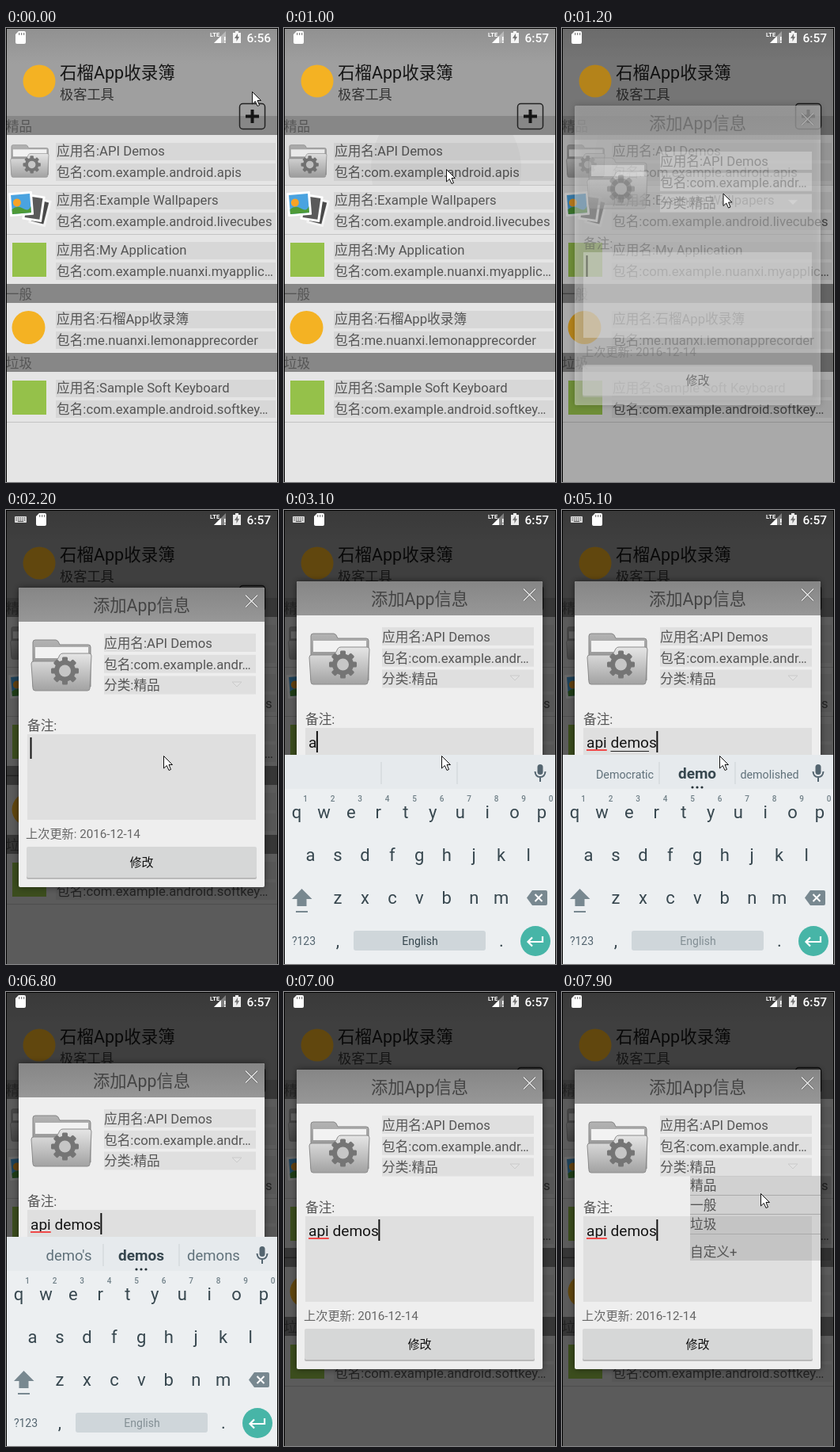
An HTML page with a canvas that plays this animation: 344x573 px, repeating every 8 s.

```html
<!DOCTYPE html>
<html lang="zh">
<head>
<meta charset="utf-8">
<title>App recorder demo</title>
<style>
  html, body { margin: 0; height: 100%; overflow: hidden; background: #000; }
  canvas { display: block; width: 344px; height: 573px; }
</style>
</head>
<body>
<canvas></canvas>
<script>
const W = 344, H = 573, LOOP = 8000, STEP = 100;
const canvas = document.querySelector('canvas');
const ctx = canvas.getContext('2d');
const ratio = window.devicePixelRatio || 1;
canvas.width = W * ratio;
canvas.height = H * ratio;

const FONT = 'Roboto, "Noto Sans CJK SC", "Noto Sans CJK", sans-serif';
const APP = '石榴App收录簿';
const INK = '#37474f';

// Timeline
const pointerPath = [
  [0, 311, 80], [100, 300, 110], [300, 240, 210], [500, 205, 178], [1100, 205, 178],
  [1500, 199, 300], [1600, 199, 300], [1800, 199, 313], [1900, 199, 310], [7100, 199, 310],
  [7200, 252, 250], [7500, 277, 222], [7700, 277, 222], [7900, 251, 254]
];
const typing = [
  [0, ''], [3100, 'a'], [3200, 'ap'], [3300, 'api'], [3800, 'api '], [4600, 'api d'],
  [4700, 'api de'], [4800, 'api dem'], [4900, 'api demo'], [5100, 'api demos']
];
const suggestions = [
  [0, []], [3200, ['as', 'a', 'at']], [3300, ['app', 'ap', 'apple']],
  [3400, ['apps', 'api', 'apiece']], [4000, []], [4700, ['do', 'd', 'did']],
  [4800, ['den', 'de', 'dear']], [4900, ['den', 'dem', 'demand']],
  [5000, ['Democratic', 'demo', 'demolished']], [5200, ["demo's", 'demos', 'demons']]
];
const caretOff = [[1700, 1900], [2800, 3100], [4200, 4600], [5700, 6200], [6600, 6800], [7300, 7800]];

const clamp = v => Math.max(0, Math.min(1, v));
const progress = (t, from, to) => clamp((t - from) / (to - from));
const easeOut = p => 1 - (1 - p) ** 2;
const within = (t, from, to) => t >= from && t < to;
const latest = (track, t) => track.filter(k => k[0] <= t).pop()[1];

function pointerAt(t) {
  const next = pointerPath.findIndex(k => k[0] > t);
  if (next < 0) return pointerPath[pointerPath.length - 1].slice(1);
  const a = pointerPath[next - 1], b = pointerPath[next];
  const p = progress(t, a[0], b[0]);
  return [a[1] + (b[1] - a[1]) * p, a[2] + (b[2] - a[2]) * p];
}

// Drawing helpers
function box(x, y, w, h, color, r = 0) {
  ctx.fillStyle = color;
  ctx.beginPath();
  ctx.roundRect(x, y, w, h, r);
  ctx.fill();
}
function disc(x, y, r, color) {
  ctx.fillStyle = color;
  ctx.beginPath();
  ctx.arc(x, y, r, 0, Math.PI * 2);
  ctx.fill();
}
function shape(d, fill, stroke, width = 1) {
  const path = new Path2D(d);
  if (fill) { ctx.fillStyle = fill; ctx.fill(path); }
  if (stroke) { ctx.strokeStyle = stroke; ctx.lineWidth = width; ctx.stroke(path); }
}
function text(str, x, y, size, color, align = 'left', style = '') {
  ctx.font = `${style} ${size}px ${FONT}`;
  ctx.fillStyle = color;
  ctx.textAlign = align;
  ctx.fillText(str, x, y);
}
function gradient(y0, y1, from, to) {
  const g = ctx.createLinearGradient(0, y0, 0, y1);
  g.addColorStop(0, from);
  g.addColorStop(1, to);
  return g;
}
function at(x, y, draw, scale = 1, angle = 0) {
  ctx.save();
  ctx.translate(x, y);
  ctx.rotate(angle);
  ctx.scale(scale, scale);
  draw();
  ctx.restore();
}

// Icons
function folder() {
  shape('M3 60V4Q3 1 6 1H32Q35 1 37 7H73Q76 7 76 10V60Z', gradient(0, 60, '#b4b4b4', '#808080'), '#858585');
  box(6, 10, 67, 14, '#f2f2f2');
  shape('M1 31Q1 28 4 28H30Q33 28 35 24L37 20Q38 18 41 18H74Q77 18 77 21L75 62Q75 65 72 65H6Q3 65 3 62Z',
    gradient(18, 65, '#e6e6e6', '#a2a2a2'), '#8c8c8c');
  at(43.5, 40, () => {
    for (let i = 0; i < 8; i++) at(0, 0, () => box(-3.5, -17.5, 7, 10, '#757575', 1.5), 1, i * Math.PI / 4);
    disc(0, 0, 13.5, '#757575');
    disc(0, 0, 7.5, '#c6c6c6');
  });
}
function photo(x, y, w, h, angle, frame, color) {
  at(x, y, () => {
    box(-w / 2, -h / 2, w, h, frame, 1);
    box(-w / 2 + 3, -h / 2 + 3, w - 6, h - 6, color);
  }, 1, angle);
}
function pictures() {
  photo(43, 36, 22, 34, .25, '#f4f4f4', '#4a4a4a');
  photo(35, 31, 25, 33, .15, '#fff', '#5a5a5a');
  photo(19, 26, 30, 30, -.08, '#fff', '#4aa3e0');
  at(19, 26, () => {
    disc(-5, -2, 5, '#f7a326');
    shape('M-12 12V6Q-5 1 2 6T12 4V12Z', '#4d9a37');
  }, 1, -.08);
}
const lemon = () => disc(28.5, 32, 21, '#f4b223');
const robot = () => box(8, 12, 43, 43, '#95c14a');

function statusBar(t) {
  const keyboardIcon = within(t, 2200, 6800);
  if (keyboardIcon) {
    box(11, 8, 15, 8, '#d8d8d8', 1);
    for (let i = 0; i < 5; i++) {
      box(12.5 + i * 2.6, 9.5, 1.3, 1.3, '#555');
      box(12.5 + i * 2.6, 12, 1.3, 1.3, '#555');
    }
    box(15, 14, 7, 1, '#555');
  }
  at(keyboardIcon ? 38 : 12, 4, () => {
    shape('M4 0H11Q13 0 13 2V14Q13 16 11 16H2Q0 16 0 14V4Z', '#fff');
    for (const x of [4, 7, 10]) box(x, 2, 1.3, 3, '#888');
  });
  text('LTE', 258, 11, 7.5, '#fff', 'left', 'bold');
  shape('M263 19L278 4V19Z', 'rgba(255,255,255,.35)');
  shape('M263 19L272 10V19Z', '#fff');
  box(276, 11, 1.6, 5, '#fff');
  box(276, 17, 1.6, 1.8, '#fff');
  shape('M287 6H290V4H294V6H297V19H287Z', 'rgba(255,255,255,.9)');
  shape('M293 7L289 13H291.500V17L295 11H293Z', '#777');
  text(t < 300 ? '6:56' : '6:57', 335, 18, 15.5, '#fff', 'right', '500');
}

function section(y, label) {
  box(1, y, 342, 24, '#878787');
  text(label, 0, y + 19, 16.5, '#555');
}
function row(y, icon, name, pkg) {
  box(1, y + 64, 342, 1, '#c4c4c4');
  at(0, y, icon);
  box(63, y + 11, 278, 22, '#d7d7d7');
  box(63, y + 37, 278, 22, '#d7d7d7');
  text('应用名:' + name, 64, y + 27, 16.7, '#555');
  text('包名:' + pkg, 64, y + 54, 16.7, '#555');
}

function addButton() {
  ctx.strokeStyle = '#222';
  ctx.lineWidth = 1.5;
  ctx.beginPath();
  ctx.roundRect(295.5, 95.5, 32, 32, 4);
  ctx.stroke();
  box(303, 109.5, 17, 4, '#151515');
  box(309.5, 103, 4, 17, '#151515');
}

function listScreen(t) {
  box(1, 1, 342, 572, '#e5e5e5');
  box(1, 1, 342, 110, gradient(1, 45, '#919191', '#9f9f9f'));
  disc(42, 67, 20.5, '#f4b223');
  text(APP, 68, 64, 21.5, '#151515');
  text('极客工具', 68, 90, 17.2, '#333');

  row(134, () => at(5, 13, folder, .636), 'API Demos', 'com.example.android.apis');
  row(196, pictures, 'Example Wallpapers', 'com.example.android.livecubes');
  row(259, robot, 'My Application', 'com.example.nuanxi.myapplic…');
  row(346, lemon, APP, 'me.nuanxi.lemonapprecorder');
  row(433, robot, 'Sample Soft Keyboard', 'com.example.android.softkey…');
  section(111, '精品');
  section(323, '一般');
  section(410, '垃圾');
  addButton();

  if (within(t, 900, 1300)) {
    ctx.save();
    ctx.beginPath();
    ctx.rect(1, 135, 342, 63);
    ctx.clip();
    box(1, 135, 342, 63, 'rgba(0,0,0,.04)');
    disc(205, 178, 60 + (t - 900) * .35, 'rgba(0,0,0,.03)');
    ctx.restore();
  }
}

function note(t) {
  const str = latest(typing, t);
  text(str, 31, 308, 19.1, '#151515');
  const endOf = s => 31 + ctx.measureText(s).width;
  const underline = (from, to, y, h, color) => box(endOf(from), y, endOf(to) - endOf(from), h, color);

  // The composing underline trails the typed letters by one step.
  const composed = latest(typing, t - STEP);
  if (within(t, 3200, 3800)) underline('', composed, 312, 1, '#222');
  if (t >= 3800) underline('', 'api', 310, 2, '#f04a4a');
  if (within(t, 4600, 6800)) underline('api ', composed, 312, 1, '#222');
  if (!caretOff.some(([from, to]) => within(t, from, to))) box(endOf(str) - .5, 287, 2, 27, '#111');
}

function dialog(t) {
  ctx.save();
  ctx.shadowColor = 'rgba(0,0,0,.5)';
  ctx.shadowBlur = 8;
  box(16, 98, 311, 378, '#eee', 2);
  ctx.restore();
  box(16, 98, 311, 43, gradient(98, 141, '#868686', '#979797'), [2, 2, 0, 0]);
  text('添加App信息', 171.5, 128, 21.3, '#444', 'center');
  const cross = 'M303 107.500L318 122.500M318 107.500L303 122.500';
  shape(cross, null, '#6c6c6c', 3);
  shape(cross, null, '#e6e6e6', 1.5);
  at(31, 163, folder);
  ['应用名:API Demos', '包名:com.example.andr…', '分类:精品'].forEach((str, i) => {
    box(124, 156 + i * 26.7, 192, 23, '#dfdfdf');
    text(str, 124, 174 + i * 26.7, 16.7, '#555');
  });
  shape('M286 217H298L292 223Z', '#e2e2e2', '#cacaca');
  text('备注:', 27, 278, 16.7, '#555');
  box(27, 283, 289, 108, '#dfdfdf');
  note(t);
  text('上次更新: 2016-12-14', 25, 414, 15.2, '#666');
  box(26, 427, 291, 39, '#b9b9b9', 2);
  box(26, 425, 291, 39, '#d6d7d7', 2);
  text('修改', 171.5, 450, 15, '#111', 'center', '500');
}

function keyRow(letters, x, y) {
  [...letters].forEach((c, i) => text(c, x + i * 34.45, y, 22, INK, 'center'));
}

function keyboard(t) {
  box(1, 309, 342, 264, '#eceff1');
  box(1, 309, 342, 43, '#e6eaed');
  box(122.5, 318, 1, 28, '#cbd2d6');
  box(218.5, 318, 1, 28, '#cbd2d6');
  const words = latest(suggestions, t);
  words.forEach((word, i) => {
    const main = i === 1;
    const size = main ? 19 : word.length > 8 ? 14.3 : 18.5;
    text(word, 79.5 + i * 91.5, 339, size, main ? INK : '#60717a', 'center', main ? 'bold' : '');
  });
  if (words.length) for (const x of [165, 171, 177]) disc(x, 350, 1.6, '#263238');

  box(320.5, 321, 7, 13, '#546570', 3.5);
  shape('M317.500 330Q318 337 324 337T330.500 330M324 337V343', null, '#546570', 2);

  keyRow('qwertyuiop', 16, 389);
  [...'1234567890'].forEach((c, i) => text(c, 27 + i * 34.5, 368, 10, '#708088', 'center', '500'));
  keyRow('asdfghjkl', 33.5, 443);
  keyRow('zxcvbnm', 68, 497);

  shape('M22.500 478L35.500 491H28.500V500H16.500V491H10Z', '#788890');
  box(15, 506, 15, 2, '#788890');
  shape('M307 489.500L314 480H331Q333 480 333 482V497Q333 499 331 499H314Z', '#788890');
  shape('M317.500 485L326.500 494M326.500 485L317.500 494', null, '#fff', 2);

  text('?123', 25, 549, 14, '#546570', 'center');
  text(',', 68, 551, 22, INK, 'center');
  box(88, 531, 167, 25, '#cfd6da', 3);
  ctx.save();
  ctx.globalAlpha = 1 - .5 * progress(t, 3100, 3400);
  text('English', 172, 549, 14, INK, 'center');
  ctx.restore();
  text('.', 275, 551, 22, INK, 'center');
  disc(318, 544, 19, '#47b5a7');
  shape('M327 538V545H309M314 539.500L308.500 545L314 550.500', null, '#fff', 2.2);
}

function dropdown() {
  box(162, 232, 178, 107, 'rgba(0,0,0,.12)');
  for (const y of [256, 280, 305]) box(162, y, 165, 1, '#aaa');
  ['精品', '一般', '垃圾', '自定义+'].forEach((str, i) =>
    text(str, 162, [250, 275, 299, 334][i], 16.7, '#555'));
}

function pointer(t) {
  if (within(t, 5900, 7200)) return;
  at(...pointerAt(t), () => shape('M.5 .5V16L4.300 12.500L7 18.500L9.500 17.500L7 11.500H11.500Z', '#fff', '#111'));
}

function draw(t) {
  ctx.setTransform(ratio, 0, 0, ratio, 0, 0);
  ctx.fillStyle = '#000';
  ctx.fillRect(0, 0, W, H);
  ctx.save();
  ctx.beginPath();
  ctx.rect(1, 1, 342, 572);
  ctx.clip();

  listScreen(t);
  const shown = easeOut(progress(t, 1100, 1500));
  const raised = easeOut(progress(t, 2200, 2500)) * (1 - progress(t, 6800, 7000));
  if (shown > 0) {
    box(1, 1, 342, 572, `rgba(0,0,0,${.6 * shown})`);
    ctx.save();
    ctx.globalAlpha = shown;
    ctx.translate(0, -8 * raised);
    dialog(t);
    ctx.restore();
  }
  if (t >= 7800) dropdown();
  if (raised > 0) at(0, 264 * (1 - raised), () => keyboard(t));
  statusBar(t);
  pointer(t);
  ctx.restore();
}

const start = performance.now();
function frame() {
  const t = (performance.now() - start) % LOOP;
  draw(Math.floor(t / STEP) * STEP);
  requestAnimationFrame(frame);
}
frame();
</script>
</body>
</html>
```
